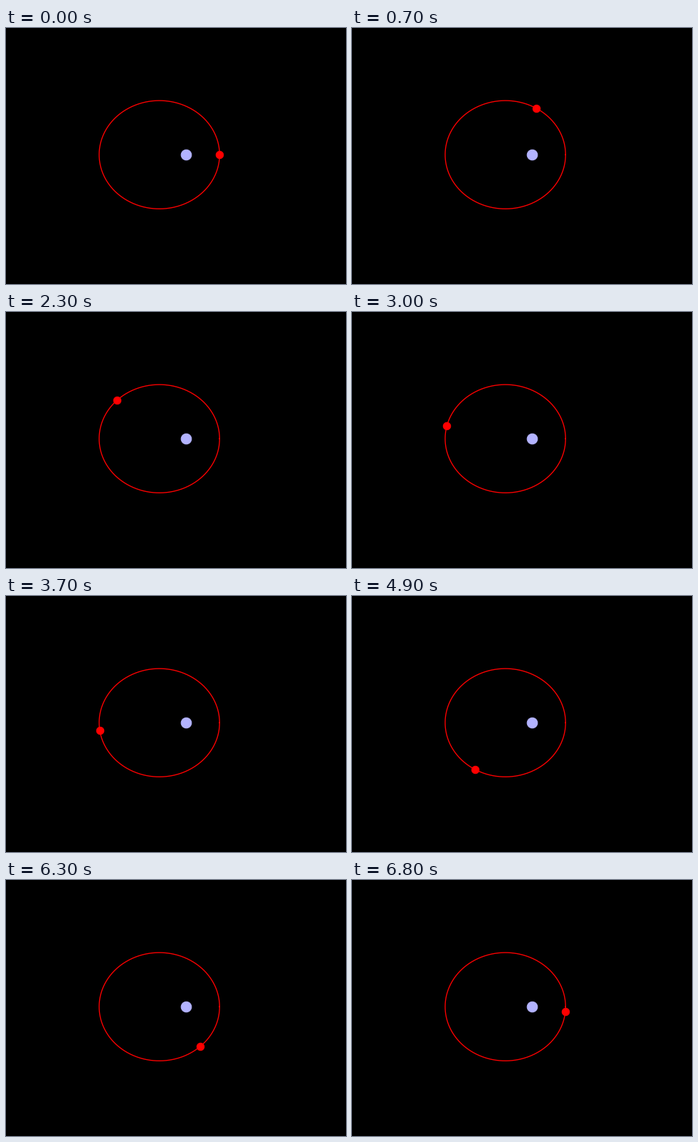
Recreate the animation shown at these times as a matplotlib script. Size 478 px wide and 360 px high, loop 6900 ms.

```python
import numpy as np
import matplotlib.pyplot as plt
from matplotlib.animation import FuncAnimation

W, H, DPI = 478, 360, 75
FRAMES, INTERVAL = 69, 100
CX, CY = 215.6, 178.2       # ellipse centre, px
A, ECC = 84.65, 0.438       # semi-major axis, eccentricity
STEP = 0.0916               # mean anomaly per frame
SUN_X = CX + A * ECC


def true_anomaly(m):
    """Equation of the centre, to third order in eccentricity."""
    e = ECC
    return (m + (2 * e - e**3 / 4) * np.sin(m)
            + 5 / 4 * e**2 * np.sin(2 * m)
            + 13 / 12 * e**3 * np.sin(3 * m))


def orbit(nu):
    r = A * (1 - ECC**2) / (1 + ECC * np.cos(nu))
    return SUN_X + r * np.cos(nu), CY - r * np.sin(nu)


fig = plt.figure(figsize=(W / DPI, H / DPI), dpi=DPI, facecolor="black")
ax = fig.add_axes([0, 0, 1, 1])
ax.set_xlim(0, W)
ax.set_ylim(H, 0)
ax.axis("off")

ax.plot(*orbit(np.linspace(0, 2 * np.pi, 400)), color="red", lw=1.3)
ax.plot([SUN_X], [CY], "o", ms=14, color=(0.7, 0.7, 1))
planet, = ax.plot([], [], "o", ms=10, color="red")


def update(i):
    x, y = orbit(true_anomaly(STEP * i))
    planet.set_data([x], [y])
    return planet,


anim = FuncAnimation(fig, update, frames=FRAMES, interval=INTERVAL,
                     repeat=True, repeat_delay=0)
plt.show()
```
